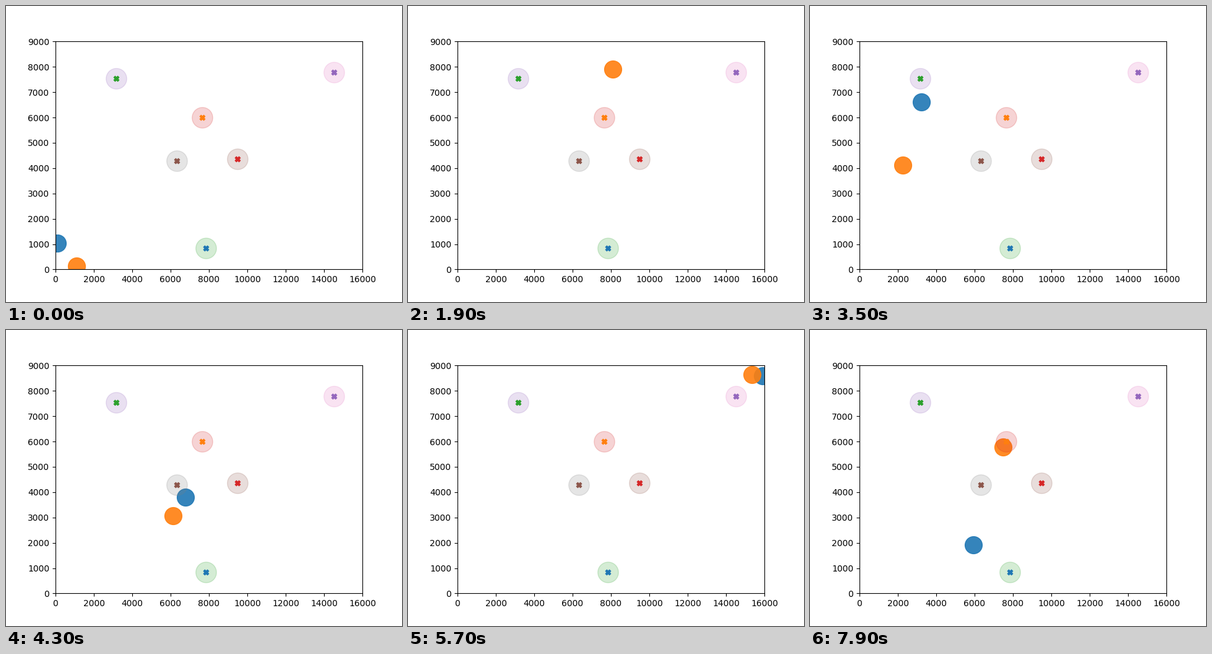
These frames come from a looping animation (640 px wide and 478 px high, 8000 ms). A matplotlib script:

```python
import numpy as np
import matplotlib.pyplot as plt
from matplotlib.animation import FuncAnimation

FRAMES, STEP_MS = 80, 100

GATES = [(7850, 830), (7650, 6000), (3170, 7540),
         (9490, 4360), (14530, 7780), (6330, 4290)]

# Key poses by step, and the step at which each gate is crossed
BLUE = dict(
    poses={0: (90, 1045), 8: (4919, 4086), 35: (3235, 6606),
           50: (13590, 5748), 66: (10623, 7876), 79: (5945, 1909)},
    crossings={1: 11, 2: 34, 3: 46, 5: 70.8, 0: 82})
ORANGE = dict(
    poses={0: (1095, 135), 8: (4139, 2548), 19: (8100, 7901),
           35: (2274, 4113), 50: (11171, 5308), 79: (7494, 5774)},
    crossings={1: 14.6, 2: 29.5, 3: 47.6, 4: 55, 5: 81})


def spline_speeds(h, slope):
    """Knot velocities of a cubic spline: at rest at first, free at the end."""
    n = len(h) + 1
    a, b = np.eye(n), np.zeros((n, 2))
    for i in range(1, n - 1):
        left, right = 1 / h[i - 1], 1 / h[i]
        a[i, i - 1:i + 2] = left, 2 * (left + right), right
        b[i] = 3 * (left * slope[i - 1] + right * slope[i])
    a[-1, -2:] = 1, 2
    b[-1] = 3 * slope[-1]
    return np.linalg.solve(a, b)


def race_path(poses, crossings):
    """Position at every step, drifting smoothly past poses and gates."""
    keys = dict(poses)
    keys.update((t, GATES[g]) for g, t in crossings.items())
    t = np.array(sorted(keys), float)
    p = np.array([keys[k] for k in sorted(keys)], float)
    gap = np.diff(t)
    v = spline_speeds(gap, np.diff(p, axis=0) / gap[:, None])

    now = np.arange(FRAMES)
    i = np.searchsorted(t, now, side="right") - 1
    h = gap[i][:, None]
    s = (now - t[i])[:, None] / h
    return ((1 + 2 * s) * (1 - s) ** 2 * p[i] + s * (1 - s) ** 2 * h * v[i]
            + s ** 2 * (3 - 2 * s) * p[i + 1] - s ** 2 * (1 - s) * h * v[i + 1])


fig, ax = plt.subplots(figsize=(6.4, 4.78), dpi=100)
ax.set_xlim(0, 16000)
ax.set_ylim(0, 9000)

paths = [race_path(**BLUE), race_path(**ORANGE)]
pods = [ax.plot([], [], "o", ms=20, alpha=0.9, color=f"C{k}")[0]
        for k in range(2)]

for k, (x, y) in enumerate(GATES):
    ax.plot(x, y, "o", ms=24, alpha=0.2, color=f"C{k + 2}")
    ax.scatter(x, y, marker="X", color=f"C{k}", zorder=2.2)


def update(step):
    for pod, path in zip(pods, paths):
        x, y = path[step]
        pod.set_data([x], [y])
    return pods


anim = FuncAnimation(fig, update, frames=FRAMES, interval=STEP_MS,
                     repeat=True, repeat_delay=0)
plt.show()
```
